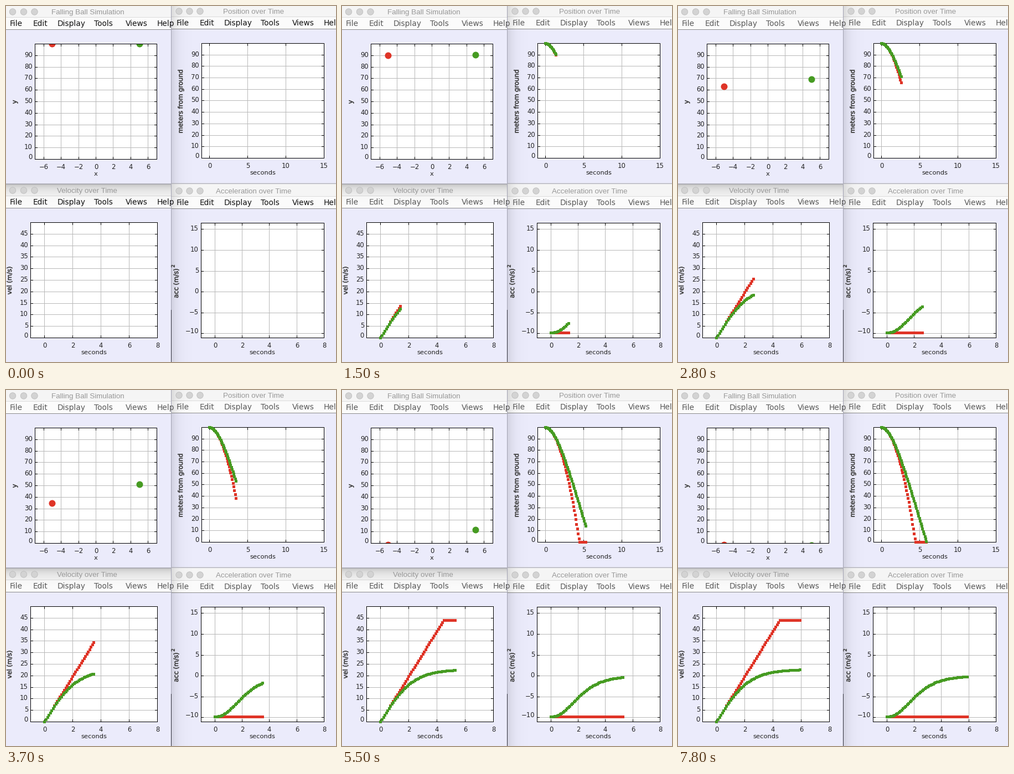
Recreate the animation shown at these times as a matplotlib script. Size 596 by 642 pixels, loop 7900 ms.

```python
import numpy as np
import matplotlib.pyplot as plt
from matplotlib.animation import FuncAnimation
from matplotlib.collections import PolyCollection
from matplotlib.patches import Circle, Rectangle
from matplotlib.patheffects import withStroke

W, H, DPI = 596, 642, 100
PX = 72 / DPI
FRAMES, INTERVAL = 79, 100
RED, GREEN = "#df3427", "#469b22"
BODY, GRID, TITLE_GRAY = "#ebebfb", "#b9b9b9", "#989898"
SANS, TITLE_FONT = "DejaVu Sans", "Liberation Sans"
MENU = [("File", 7), ("Edit", 49), ("Display", 93),
        ("Tools", 160), ("Views", 216), ("Help", 273)]

fig = plt.figure(figsize=(W / DPI, H / DPI), dpi=DPI)
ax = fig.add_axes([0, 0, 1, 1])
ax.set_xlim(0, W)
ax.set_ylim(H, 0)
ax.axis("off")
menu_texts = []


def rect(x0, y0, x1, y1, color, z=1):
    patch = Rectangle((x0, y0), x1 - x0, y1 - y0, fc=color, lw=0,
                      antialiased=False, zorder=z)
    return ax.add_patch(patch)


def line(x0, y0, x1, y1, color, z=2):
    """Horizontal or vertical line, one pixel wide, both ends included."""
    rect(x0, y0, x1 + 1, y1 + 1, color, z)


def text(x, y, s, size, color="#222222", font=SANS, **kw):
    kw.setdefault("va", "baseline")
    return ax.text(x, y, s, fontsize=size * PX, color=color, family=font,
                   zorder=5, **kw)


def side_label(x, y, s, size=11.5):
    text(x, y, s, size, "#444444", rotation=90, ha="center", va="center",
         path_effects=[withStroke(linewidth=.4, foreground="#444444")])


def shadow(x0, y0, x1, y1, strength, reach, across):
    """Soft shadow fading to the right (across) or downwards."""
    d = np.arange((x1 - x0) if across else (y1 - y0))
    fade = strength * np.exp(-d / reach)
    rgba = np.zeros((1, d.size, 4) if across else (d.size, 1, 4))
    rgba[..., 3] = fade.reshape(rgba.shape[:2])
    ax.imshow(rgba, extent=(x0, x1, y1, y0), aspect="auto",
              interpolation="nearest", zorder=2.5)


def window(x0, y0, x1, y1, title, title_x, menu_y, shift, lights):
    """Window chrome: title bar, buttons, menu bar and body."""
    frame = rect(x0, y0, x1, y1, BODY)
    rect(x0, y0, x1, menu_y - 21, "#f5f5f5")
    rect(x0, menu_y - 21, x1, menu_y, "#fbfbfb")
    line(x0, menu_y - 22, x1 - 1, menu_y - 22, "#dcdcdc")
    line(x0, menu_y, x1 - 1, menu_y, "#8c8c8c")
    mid = menu_y - 31.5
    for x in lights:
        ax.add_patch(Circle((x, mid), 5.7, fc="#d3d3d3", ec="#bdbdbd",
                            lw=.6, zorder=3))
    text(title_x, mid + 4.5, title, 13.35, TITLE_GRAY, TITLE_FONT)
    for name, x in MENU:
        t = text(x + shift - .6, menu_y - 6, name, 13.8)
        t.set_clip_path(frame)
        menu_texts.append(t)


class Plot:
    """Boxed plot given by its pixel box and its data ranges."""

    def __init__(self, box, xr, yr):
        self.box, self.xr, self.yr = box, xr, yr

    def x(self, v):
        l, _, r, _ = self.box
        return l + (v - self.xr[0]) * (r - l) / (self.xr[1] - self.xr[0])

    def y(self, v):
        _, t, _, b = self.box
        return b - (v - self.yr[0]) * (b - t) / (self.yr[1] - self.yr[0])

    def draw(self, xticks, yticks, xlabel):
        l, t, r, b = self.box
        rect(l, t, r, b, "white")
        for v in xticks:
            x = round(self.x(v))
            if x < r:
                line(x, t, x, b, GRID)
            line(x, t, x, t + 4, "black", 3)
            line(x, b - 4, x, b, "black", 3)
            text(x + .5, b + 18, str(v).replace("-", "\u2212"), 11.6,
                 ha="center")
        for i, v in enumerate(yticks):
            y = round(self.y(v))
            if y < b:
                line(l, y, r, y, GRID)
            line(l, y, l + 4, y, "black", 3)
            line(r - 4, y, r, y, "black", 3)
            # the lowest label sits on its line, the others are centred
            text(l - 4, y + (3 if i else 0), str(v).replace("-", "\u2212"),
                 11.6, ha="right")
        for a in ((l, t, r, t), (l, b, r, b), (l, t, l, b), (r, t, r, b)):
            line(*a, "black", 3)
        text((l + r) / 2, b + 30, xlabel, 11.5, ha="center")

    def series(self, color):
        dots = PolyCollection([], fc=color, lw=0, antialiased=False, zorder=6)
        return ax.add_collection(dots, autolim=False)

    def show(self, dots, values, count):
        squares = []
        for i in range(min(max(count, 0), len(values))):
            x, y = round(self.x(i * DT)) - 2, round(self.y(values[i])) - 2
            squares.append([(x, y), (x + 5, y), (x + 5, y + 5), (x, y + 5)])
        dots.set_verts(squares)


DT, G, STEPS = .1, 9.8, 60


def fall(drag):
    """Height, speed and acceleration per step, stopping at the ground."""
    y, v, a = 100, 0, -G
    rows = [(y, v, a)]
    for _ in range(STEPS):
        if y > 0:
            a = -G + drag * v * v
            v -= a * DT
            y -= v * DT
        rows.append((y, v, a))
    return list(zip(*rows))


left_lights, right_lights = (12, 32, 51.5), (312.5, 331.5, 350.5)
rect(0, 0, W, H, "#d4d4de", 0)
window(0, 0, 298, 320, "Falling Ball Simulation", 81.5, 42, 0, left_lights)
window(299, 0, W, 319, "Position over Time", 392.5, 41, 301, right_lights)
window(0, 322, 298, H, "Velocity over Time", 92, 364, 0, left_lights)
window(299, 321, W, H, "Acceleration over Time", 379, 365, 301, right_lights)
line(298, 0, 298, 547, "#a4a4b4", 3)
line(298, 548, 298, H, "#30303c", 3)
line(0, 320, W, 320, "#b4b4bc", 3)
shadow(299, 0, 345, H, .11, 11, True)
shadow(0, 321, 298, 360, .2, 10, False)
ax.set(xlim=(0, W), ylim=(H, 0))

balls = Plot((52, 68, 272, 276), (-7, 7), (0, 100))
position = Plot((353, 67, 574, 274), (-1, 15), (0, 100))
velocity = Plot((44, 390, 273, 598), (-1, 8), (0, 50))
accel = Plot((352, 391, 574, 598), (-1, 8), (-11, 16.5))
balls.draw(range(-6, 7, 2), range(0, 100, 10), "x")
position.draw(range(0, 16, 5), range(0, 100, 10), "seconds")
velocity.draw(range(0, 9, 2), range(0, 50, 5), "seconds")
accel.draw(range(0, 9, 2), range(-10, 16, 5), "seconds")
side_label(16, 173, "y")
side_label(316, 172, "meters from ground")
side_label(7, 495, "vel (m/s)")
side_label(308, 500, "acc (m/s)")
side_label(302, 469, "2", 8.5)

bodies = []
clip = Rectangle((52, 69), 220, 207, transform=ax.transData)
for color, x, drag in ((RED, -5, 0), (GREEN, 5, .019)):
    ball = ax.add_patch(Circle((round(balls.x(x)) + .5, 0), 6, fc=color,
                               lw=0, zorder=6))
    ball.set_clip_path(clip)
    dots = [p.series(color) for p in (position, velocity, accel)]
    bodies.append((ball, dots, fall(drag)))


def update(k):
    for t in menu_texts:
        t.set_color("#585858" if k else "#101010")
    # the plots fall one step behind the balls as the run goes on
    shown = k if k < 21 else k - 1
    for ball, (pos, vel, acc), (ys, vs, accs) in bodies:
        y = ys[min(max(k - 1, 0), STEPS)]
        ball.center = (ball.center[0], round(balls.y(y)) + .5)
        position.show(pos, [max(h, 0) for h in ys[:STEPS]], shown)
        velocity.show(vel, vs[:STEPS], shown)
        accel.show(acc, accs[:STEPS], k - 1)
    return []


anim = FuncAnimation(fig, update, frames=FRAMES, interval=INTERVAL,
                     repeat=True, repeat_delay=0, blit=False)
plt.show()
```
